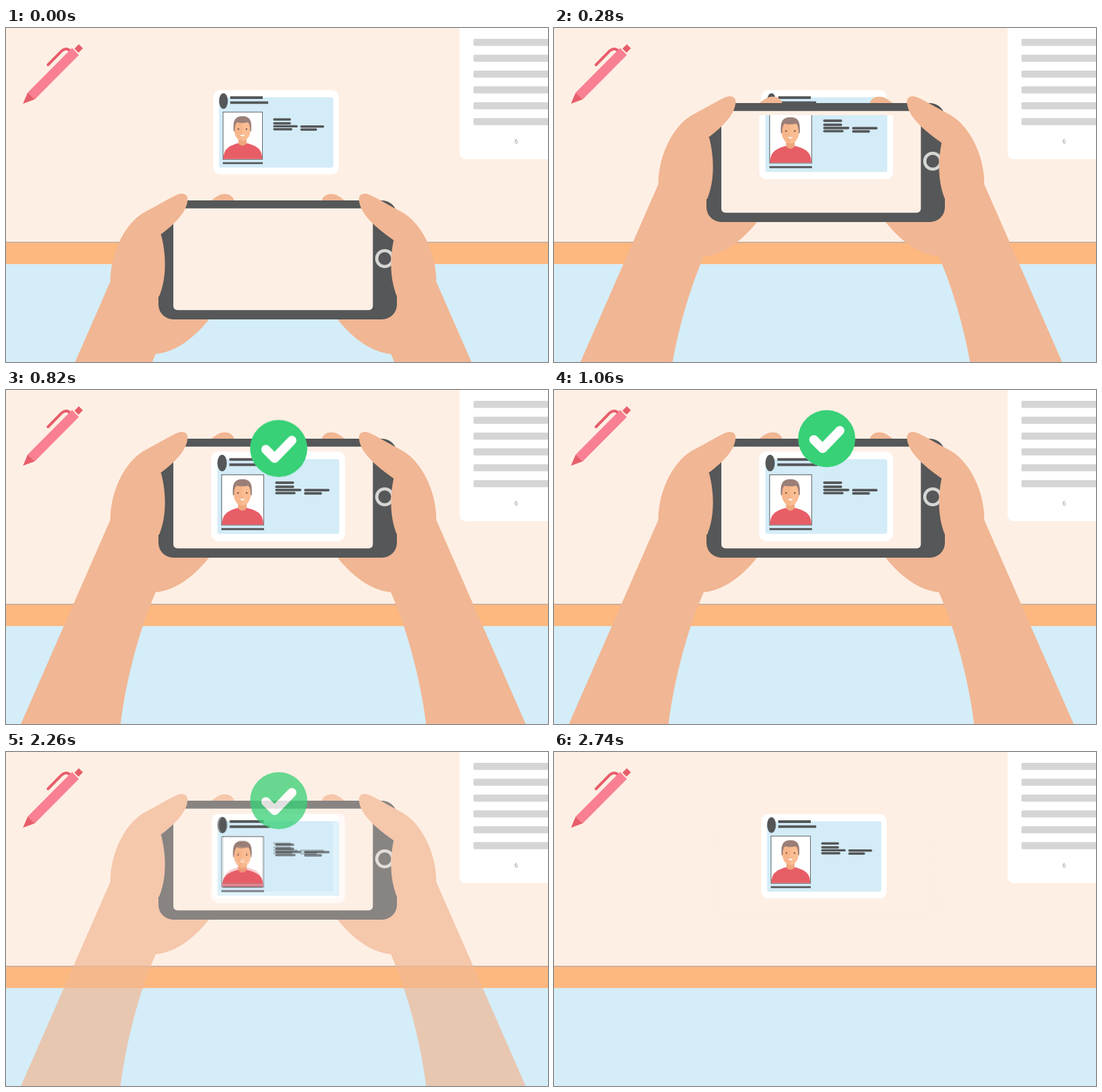
Recreate the animation shown at these times as an HTML page without scripts. Size 800 by 494 pixels, loop 2.76 s.

```html
<!DOCTYPE html>
<html lang="en">
<head>
<meta charset="utf-8">
<title>Scan an ID card</title>
<style>
  html, body { margin: 0; width: 100%; height: 100%; overflow: hidden; background: #feefe4; }
  svg { display: block; width: 100vw; height: 100vh; }

  .skin { fill: #f1b693; }
  .dark { fill: #555758; }
  .red { fill: #e75e67; }

  /* One loop: lift the phone, confirm, hold, fade away */
  .phone, .lift, .stay, .slide, .badge { animation: 2.76s linear infinite; }
  .phone { animation-name: phone-fade; }
  .lift  { animation-name: lift; }
  .stay  { animation-name: stay; }
  .slide { animation-name: slide; }
  .badge { animation-name: badge-fade; }

  @keyframes lift {
    0% { transform: translateY(183px); animation-timing-function: cubic-bezier(.333, 0, .667, 1); }
    14.493%, 100% { transform: translateY(0); }
  }
  /* Cancels the lift, so the card stands still behind its moving window */
  @keyframes stay {
    0% { transform: translateY(-183px); animation-timing-function: cubic-bezier(.333, 0, .667, 1); }
    14.493%, 100% { transform: translateY(0); }
  }
  @keyframes phone-fade {
    0%, 74.638% { opacity: 1; }
    88.406% { opacity: .43; }
    95.652% { opacity: .04; }
    100% { opacity: 0; }
  }
  @keyframes slide {
    0%, 18.116% { transform: translateY(37px); animation-timing-function: cubic-bezier(.333, 0, .667, 1); }
    38.406%, 100% { transform: translateY(0); }
  }
  @keyframes badge-fade {
    0%, 18.116% { opacity: 0; animation-timing-function: cubic-bezier(.333, 0, .667, 1); }
    24.638%, 74.638% { opacity: 1; }
    88.406% { opacity: .54; }
    99.275%, 100% { opacity: 0; }
  }
</style>
</head>
<body>
<svg viewBox="0 0 800 494" preserveAspectRatio="none">
  <defs>
    <clipPath id="window"><rect x="247" y="90.5" width="294" height="143.5"/></clipPath>

    <g id="card">
      <rect x="306" y="92" width="185" height="124.5" rx="10" fill="#fff"/>
      <rect x="314.5" y="102.5" width="168.5" height="104" rx="3" fill="#d3ecf8"/>
      <ellipse class="dark" cx="321" cy="108" rx="6.5" ry="11.5"/>
      <g stroke="#555758" stroke-width="3.8">
        <path d="M331 103h48M331 110.3h56"/>
        <path stroke-width="2.8" d="M320 199.8h59"/>
        <path stroke-width="3.4" stroke-linecap="round"
          d="M396 135.3h23M396 141h23M396 145.4h33M396 149.8h25M436 145.7h32M436 150.2h21.500"/>
      </g>
      <rect x="320.3" y="124.3" width="58.200" height="70" fill="#fff" stroke="#555758" stroke-width=".9"/>
      <path class="red" d="M320.800 193.800C321 180 327 175 342 170.500H356C372 175 378 180 378 193.800Z"/>
      <path fill="#f0a77c" d="M343 161h12v10q-6 6.500-12 0Z"/>
      <path fill="#fbbd92" d="M336.500 143C336 136 342 134 349 134S362 136 361.500 143C362 156 358 167 349 167S336 156 336.500 143Z"/>
      <path fill="#f1ab82" d="M336.500 143C336 136 342 134 349 134V167C340 167 336 156 336.500 143Z" opacity=".45"/>
      <path fill="#9a7f78" d="M336 153C335 138 337 130.500 349 130.500S363 138 362 153L360.300 152C360.500 146 359.500 142 357 139.500Q348 141.500 341 139.500C338.500 142 337.500 146 337.700 152Z"/>
      <circle cx="343" cy="149.500" r="1.200" fill="#7b5a4c"/>
      <circle cx="355" cy="149.500" r="1.200" fill="#7b5a4c"/>
      <path fill="#fff" d="M345.500 158h7q-3.500 4.500-7 0Z"/>
    </g>

    <path id="arm" class="skin" d="M154 192L22 494H169C180 410 203 340 221 299C250 297 280 274 301 246V120H190Z"/>
    <path id="finger" class="skin" d="M297 76C306 71 312 63 322 62.500C332 62.500 336 67 338 76Z"/>
    <path id="thumb" class="skin" d="M268 70C268 64 263 61 256 62.500C247 65 228 77 209 87C178 101 154 147 154 192V215L214 210V133L229 122C250 106 268 88 268 70Z"/>
    <path id="palm" class="skin" d="M206 120L229 123C236 150 238 185 226 214H206Z"/>
  </defs>

  <!-- desk -->
  <rect width="800" height="494" fill="#feefe4"/>
  <rect y="317" width="800" height="32.500" fill="#fdb87f"/>
  <rect y="316.200" width="800" height="1.600" fill="#c4aa9c"/>
  <rect y="349.300" width="800" height="145" fill="#d4edf8"/>

  <!-- pen -->
  <path d="M62 54.500L82 34Q90 27.500 95.500 35" fill="none" stroke="#e75e6b" stroke-width="4" stroke-linecap="round"/>
  <path fill="#f97f92" d="M32 95.500L97.500 29.500L107.500 40L42.500 105.500Z"/>
  <path fill="#e75e6b" d="M25 112L32 95.500L42.500 105.500ZM101 30.500L107.500 24L113.500 30L107 36.500Z"/>

  <!-- sheet -->
  <rect x="669.500" y="-20" width="160" height="214" rx="9" fill="#fff"/>
  <g fill="#d5d5d5">
    <rect id="line" x="690" y="16" width="120" height="10.500" rx="2"/>
    <use href="#line" y="23.450"/>
    <use href="#line" y="46.900"/>
    <use href="#line" y="70.350"/>
    <use href="#line" y="93.800"/>
    <use href="#line" y="117.250"/>
  </g>
  <text x="753" y="171.300" text-anchor="middle" font-family="Roboto, sans-serif" font-size="9" fill="#999">6</text>

  <use href="#card"/>

  <g class="phone">
    <g class="lift">
      <use href="#arm"/>
      <use href="#arm" transform="translate(789) scale(-1 1)"/>
      <use href="#finger"/>
      <use href="#finger" transform="translate(803) scale(-1 1)"/>

      <rect class="dark" x="225" y="72" width="352" height="176" rx="22"/>
      <rect x="247" y="83.800" width="294.500" height="150.400" rx="6" fill="#feefe5"/>
      <circle cx="559" cy="158" r="11.800" fill="none" stroke="#d6d6d4" stroke-width="4.600"/>
      <g clip-path="url(#window)">
        <g class="stay">
          <use href="#card" transform="translate(303 91) scale(1.067 1.064) translate(-306 -92)"/>
        </g>
      </g>

      <use href="#palm"/>
      <use href="#palm" transform="translate(803) scale(-1 1)"/>
      <use href="#thumb"/>
      <use href="#thumb" transform="translate(789) scale(-1 1)"/>
    </g>
  </g>

  <g class="badge">
    <g class="slide">
      <circle cx="402.500" cy="72" r="42.200" fill="#38d177"/>
      <path d="M383.500 73.500L396.500 86.500L422 60" fill="none" stroke="#fff" stroke-width="13.500" stroke-linecap="round" stroke-linejoin="round"/>
    </g>
  </g>
</svg>
</body>
</html>
```
